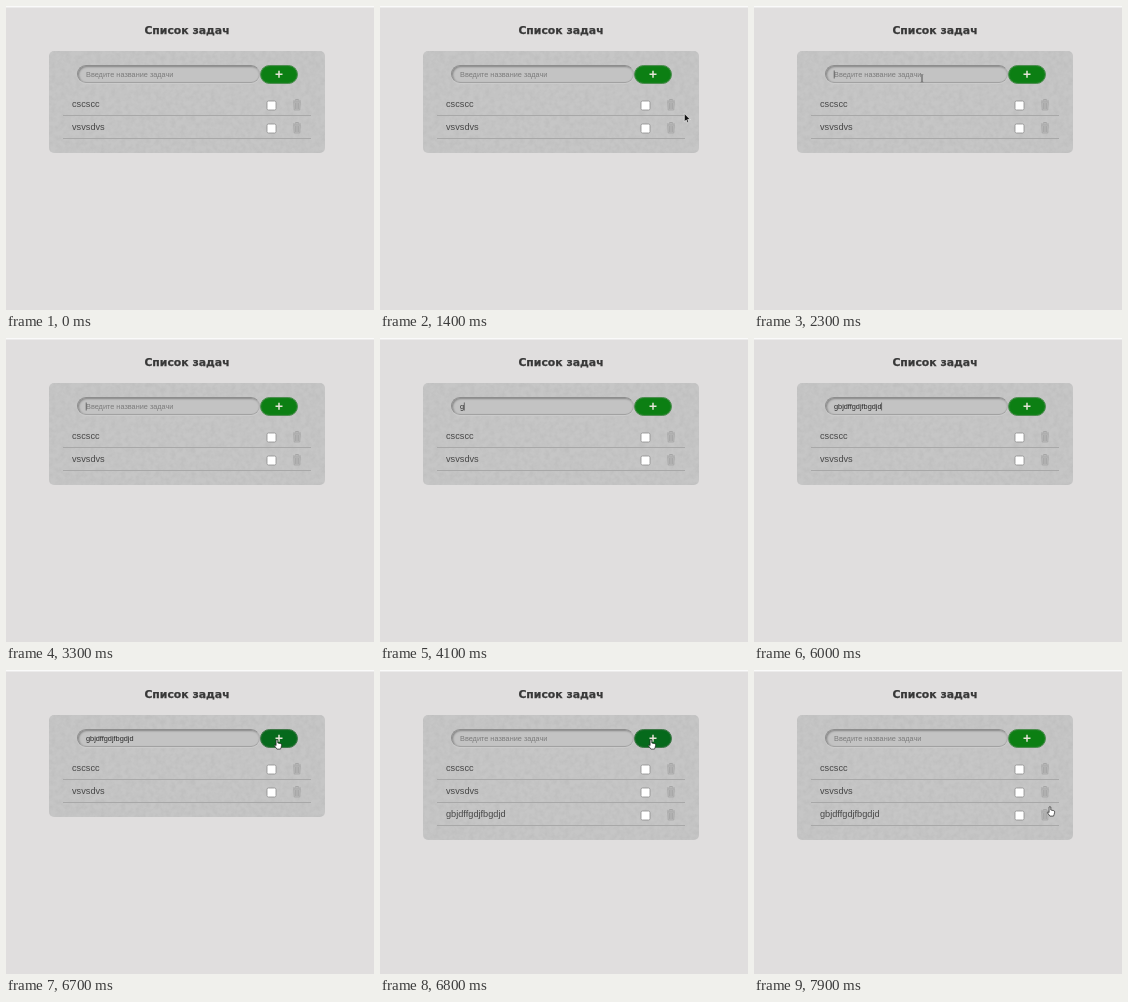
These frames come from a looping animation (368 by 304 pixels, 8 s). An HTML page:

```html
<!DOCTYPE html>
<html lang="ru">
<head>
<meta charset="utf-8">
<title>Список задач</title>
<style>
  html, body { margin: 0; width: 100%; height: 100%; overflow: hidden; background: #e0dede; }
  svg, .field, .add { position: absolute; box-sizing: border-box; }
  svg { left: 0; top: 0; }
  text { font: 9.2px "Liberation Sans", Arial, sans-serif; fill: #464646; }
  .title { font: bold 10.85px "DejaVu Sans", sans-serif; fill: #383838; stroke: #383838; stroke-width: .25; text-anchor: middle; }
  .small { font-size: 7.33px; fill: #282828; }
  .hint { fill: #7b7b7b; }
  .field {
    left: 71px; top: 59px; width: 183px; height: 18px; border-radius: 9px;
    border: 1px solid; border-color: #8d8d8d #acacac #a2a2a2 #8d8d8d;
    background: #c3c3c3; box-shadow: inset 1px 1px 2px #858585, 0 1px 1px #cdcdcd;
  }
  .add {
    left: 254px; top: 59px; width: 38px; height: 19px; border-radius: 9.5px;
    border: 1px solid #4e8d51; background: #0c7f13; box-shadow: inset 0 0 2px #2a8530;
  }
  .add.hover { background: #066a1c; border-color: #41774a; box-shadow: inset 0 0 2px #20702f; }
</style>
</head>
<body>
<svg width="368" height="304">
  <filter id="grain" x="0" y="0" width="1" height="1" color-interpolation-filters="sRGB">
    <feTurbulence type="fractalNoise" baseFrequency=".2" numOctaves="2" seed="4"/>
    <feColorMatrix values="0 0 0 0 .4  0 0 0 0 .4  0 0 0 0 .4  .14 0 0 0 -.05"/>
    <feComposite in2="SourceGraphic" operator="in"/>
  </filter>
  <rect width="368" height="1.5" fill="#fafafa"/>
  <rect class="card" x="43" y="45" width="276" rx="5" fill="#c6c6c6"/>
  <rect class="card" x="43" y="45" width="276" rx="5" filter="url(#grain)"/>
</svg>
<div class="field"></div>
<div class="add" id="add"></div>
<svg width="368" height="304">
  <defs>
    <g id="tools">
      <rect x="57" y="109" width="248" height="1" fill="#a8a8a8"/>
      <rect x="261" y="95" width="9" height="9" rx="1.5" fill="#fff" stroke="#8c8c8c" stroke-width=".8"/>
      <path d="M287 95h8M289.5 94.5v-1h3v1" fill="none" stroke="#a6a6a6"/>
      <path d="M287.7 96h6.6l-.5 8h-5.6z" fill="#bababa" stroke="#a6a6a6" stroke-width=".8"/>
      <path d="M289.5 97v6M291 97v6M292.5 97v6" stroke="#9c9c9c" stroke-width=".6"/>
    </g>
  </defs>
  <text class="title" x="181" y="28.2">Список задач</text>
  <text class="small hint" id="hint" x="80" y="71">Введите название задачи</text>
  <text class="small" id="value" x="80" y="71"></text>
  <rect id="caret" y="64.5" width=".7" height="8" fill="#444"/>
  <path d="M273 64.8v7M269.5 68.3h7" stroke="#e6e4d8" stroke-width="1.5"/>
  <g id="rows"></g>
  <g id="cursor">
    <path id="arrow" d="M0 0v8.2l1.9-1.7 1.2 2.8 1.4-.6-1.2-2.7h2.6z" fill="#111" stroke="#fff" stroke-width=".6"/>
    <path id="beam" d="M-1.3-3.5q1.3 0 1.3 .8v6q0 .8-1.3 .8M1.3-3.5q-1.3 0-1.3 .8v6q0 .8 1.3 .8" fill="none" stroke="#555" stroke-width=".6"/>
    <path id="hand" d="M-.9 0q.9-1 1.7 0v3l3 .7q1 .3 .9 1.4l-.6 2.4-.6 1.6h-3.6l-2.6-3.6q.4-1.1 1.8 0z" fill="#fff" stroke="#222" stroke-width=".7"/>
  </g>
</svg>
<script>
const $ = id => document.getElementById(id);
const LOOP = 8000, STEP = 100;
const FOCUS = 2300, TYPE = 4100, TYPED = 4900, ADD = 6800, BLUR = 6600;
const word = 'gbjdffgdjfbgdjd';

// Each pointer move is an eased curve: start, bend, end
const moves = [
  { from: 1200, to: 2000, curve: [[331, 116], [245, 88], [168, 72]] },
  { from: 2700, to: 3100, curve: [[168, 72], [260, 176], [380, 16]] },
  { from: 6000, to: 6600, curve: [[376, 20], [310, 52], [271, 70]] },
  { from: 7300, to: 7900, curve: [[271, 70], [318, 110], [296, 137]] }
];

const clamp = (v, lo, hi) => Math.min(hi, Math.max(lo, v));
const ease = k => k * k * (3 - 2 * k);
const inside = (p, x, y, w, h) => p && p[0] >= x && p[0] < x + w && p[1] >= y && p[1] < y + h;
const show = (el, on) => el.style.display = on ? '' : 'none';

function pointer(t) {
  const move = moves.findLast(m => t >= m.from);
  if (!move) return null;
  const k = ease(clamp((t - move.from) / (move.to - move.from), 0, 1));
  const [a, b, c] = move.curve;
  return [0, 1].map(i => (1 - k) ** 2 * a[i] + 2 * k * (1 - k) * b[i] + k * k * c[i]);
}

function lettersTyped(t) {
  if (t < TYPE || t >= ADD) return 0;
  const share = clamp((t - TYPE) / (TYPED - TYPE), 0, 1);
  return 1 + Math.floor(share * (word.length - 1));
}

// The caret blinks once a second, counted from the last key or click
function caretOn(t) {
  if (t < FOCUS || t >= BLUR) return false;
  const since = t < TYPE ? t - FOCUS : Math.max(0, t - TYPED);
  return since % 1000 < 550;
}

$('rows').innerHTML = ['cscscc', 'vsvsdvs', word].map((name, i) =>
  `<g transform="translate(0 ${23 * i})"><text x="66" y="101.4">${name}</text><use href="#tools"/></g>`).join('');

function draw(time) {
  const t = Math.floor(time % LOOP / STEP) * STEP;
  const added = t >= ADD;
  const typed = lettersTyped(t);

  $('value').textContent = word.slice(0, typed);
  show($('hint'), !typed);
  show($('caret'), caretOn(t));
  $('caret').setAttribute('x', 79.8 + (typed ? $('value').getComputedTextLength() : 0));

  show($('rows').lastChild, added);
  for (const card of document.querySelectorAll('.card')) card.setAttribute('height', added ? 125 : 102);

  const p = pointer(t);
  const onAdd = inside(p, 254, 59, 38, 19);
  const onField = inside(p, 71, 59, 183, 18);
  const onTrash = inside(p, 286, 135, 13, 18);
  show($('cursor'), p);
  if (p) $('cursor').setAttribute('transform', `translate(${p})`);
  show($('beam'), onField);
  show($('hand'), onAdd || onTrash);
  show($('arrow'), !onField && !onAdd && !onTrash);
  $('add').classList.toggle('hover', onAdd);
}

const start = performance.now();
function tick() {
  draw(performance.now() - start);
  requestAnimationFrame(tick);
}
tick();
</script>
</body>
</html>
```
